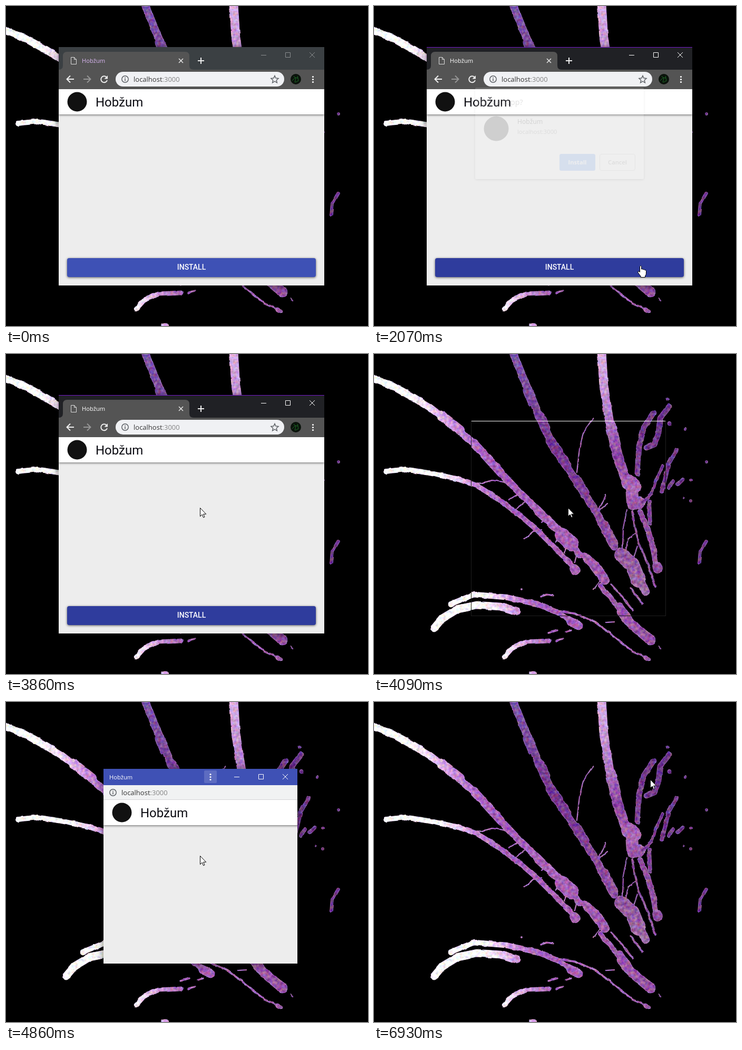
These frames come from a looping animation (687x608 px, 7.48 s). An HTML page:

```html
<!DOCTYPE html>
<html lang="en">
<head>
<meta charset="utf-8">
<title>App install</title>
<style>
  html, body { margin: 0; width: 100%; height: 100%; overflow: hidden; background: #000; }
  body > svg { position: absolute; left: 0; top: 0; will-change: transform; }
  text { font-family: "Open Sans", sans-serif; white-space: pre; }
  .roboto { font-family: Roboto, sans-serif; }
  .small { font-size: 11.2px; }
  .url { font-size: 13px; fill: #333; }
  .dim { fill: #858585; }
  .line { fill: none; stroke-width: 1; }
  .shadow { filter: drop-shadow(0 1px 2px #0009); }
  .window { filter: drop-shadow(0 2px 8px #0008); }
  #paint path { fill: none; stroke-linecap: round; stroke-linejoin: round; }
</style>
</head>
<body>

<!-- Paint splashes on the desktop -->
<svg width="687" height="608">
  <defs>
    <linearGradient id="across" gradientUnits="userSpaceOnUse" x1="0" y1="0" x2="445" y2="-156">
      <stop offset=".08" stop-color="#fff"/>
      <stop offset=".14" stop-color="#f0d4f4"/>
      <stop offset=".2" stop-color="#cb90d9"/>
      <stop offset=".3" stop-color="#a35cba"/>
      <stop offset=".48" stop-color="#a962b6"/>
      <stop offset=".75" stop-color="#8b4b9c"/>
      <stop offset="1" stop-color="#6a3488"/>
    </linearGradient>
    <linearGradient id="down" gradientUnits="userSpaceOnUse" x1="0" y1="0" x2="0" y2="300">
      <stop offset="0" stop-color="#dcb2e4"/>
      <stop offset=".4" stop-color="#b07ac4"/>
      <stop offset=".65" stop-color="#8a459f"/>
      <stop offset=".85" stop-color="#ad69b6"/>
      <stop offset="1" stop-color="#91509f"/>
    </linearGradient>
    <linearGradient id="middle" gradientUnits="userSpaceOnUse" x1="0" y1="0" x2="0" y2="450">
      <stop offset="0" stop-color="#8158a8"/>
      <stop offset=".4" stop-color="#74368e"/>
      <stop offset=".75" stop-color="#8f4f9e"/>
      <stop offset="1" stop-color="#9d6aa6"/>
    </linearGradient>
    <filter id="rough" filterUnits="userSpaceOnUse" x="0" y="0" width="687" height="608" color-interpolation-filters="sRGB">
      <feTurbulence type="fractalNoise" baseFrequency=".07" numOctaves="2" seed="4"/>
      <feDisplacementMap in="SourceGraphic" scale="4" xChannelSelector="R" yChannelSelector="G" result="shape"/>
      <feTurbulence type="fractalNoise" baseFrequency=".16" numOctaves="4" seed="9"/>
      <feColorMatrix values="1 .3 0 0 -.15  .3 1 0 0 -.15  0 .3 1 0 -.15  0 0 0 0 1" result="grain"/>
      <feComposite in="shape" in2="grain" operator="arithmetic" k2="1" k3=".44" k4="-.22"/>
      <feComposite in2="shape" operator="in" result="body"/>
      <feMorphology in="shape" operator="erode" radius="1" result="core"/>
      <feFlood flood-color="#d0a5e4" flood-opacity=".28"/>
      <feComposite in2="shape" operator="in"/>
      <feComposite in2="core" operator="out" result="rim"/>
      <feMerge><feMergeNode in="body"/><feMergeNode in="rim"/></feMerge>
    </filter>
  </defs>
  <g id="paint" filter="url(#rough)" stroke="url(#across)">
    <path stroke-width="14" d="M-8 44L35 61 75 83 105 101 130 120 165 148 200 180 240 225 275 262 310 295 340 325 372 352 388 380"/>
    <path stroke-width="19" d="M128 117L163 145M418 402L438 429M470 490L490 516M487 512L525 544"/>
    <path stroke-width="16" d="M190 170L240 225M310 298L345 330M404 388L420 404M466 480L480 500"/>
    <path stroke-width="28" d="M357 344L375 361"/>
    <path stroke-width="10" d="M23 223L60 219 110 227 160 238 195 250 235 275 275 305 310 335 345 370 378 404M388 381L402 384M430 440L462 480"/>
    <path stroke-width="18" d="M380 408L383 411"/>

    <g stroke="url(#middle)">
      <path stroke-width="15" d="M263 -5L283 45 300 85 317 125 340 175 370 220 395 258 420 298 440 335 456 366"/>
      <path stroke-width="19" d="M292 70L300 90M315 118L325 140M335 165L365 210M385 240L400 265M436 325L454 360"/>
      <path stroke-width="28" d="M470 382L490 400 502 430"/>
      <path stroke-width="17" d="M508 435L515 451"/>
    </g>
    <g stroke="url(#down)">
      <path stroke-width="17" d="M432 -5L436 60 447 130 460 190 475 235"/>
      <path stroke-width="20" d="M449 135L462 192 476 235"/>
      <path stroke-width="30" d="M484 244L492 251"/>
      <path stroke-width="24" d="M489 255L491 284 503 283"/>
      <path stroke-width="11" d="M505 300L520 335 530 370 536 404"/>
      <path stroke-width="18" d="M537 403L538 408"/>
    </g>

    <path stroke-width="11" d="M530 112L512 140 503 175 500 227M560 100L543 122 540 150 532 172 517 178"/>
    <path stroke-width="8" d="M575 182L560 205 553 235 546 262M522 280L524 322M567 242L560 254M585 239L576 248"/>
    <path stroke-width="6" d="M548 212L535 240 527 265 510 282M557 86v.1M591 143v.1M631 205v.1M601 279v.1M601 239v.1M630 356L619 375 617 397"/>
    <path stroke-width="9" d="M561 132v1M247 576L265 556 290 547 332 545"/>
    <path stroke-width="15" d="M114 521L130 502 160 484 195 477 240 480 270 489M301 610h2"/>
    <path stroke-width="11" d="M146 475L190 457 250 462 310 475 350 492 390 515"/>
    <path stroke-width="17" d="M374 509L389 516"/>
    <path stroke-width="4" d="M340 486L380 492 420 510 460 540 490 565 522 580M490 298L495 330 503 360 520 400 534 442M450 438L470 460 492 487M487 445L510 475M588 273v.1M280 447v.1"/>
    <path stroke-width="9" d="M515 577L521 580"/>
    <path stroke-width="3.5" d="M331 530L348 525M364 528L374 525M346 545L358 541M316 461L328 457 340 459"/>
    <path stroke-width="2.5" d="M416 123L397 150 390 180 385 225M480 295L473 330 472 370M495 340L482 352 478 372M197 247L225 240 252 244M256 278L272 268M268 295L285 282M285 352L303 337 318 334M440 268L425 300M443 284L428 297M416 447L428 432M318 320L325 312M345 358L350 352M362 378L366 366M381 396L384 384M440 510L456 509M540 555L544 560M500 365L493 385"/>
  </g>
</svg>

<!-- Windows -->
<svg width="687" height="608">
  <defs>
    <path id="controls" class="line" d="M0 5.5h10M46.5.5h9v9h-9zM92 0l10 10m0-10L92 10"/>
    <g id="info">
      <circle r="6.2" fill="none" stroke="#5f6368" stroke-width="1.5"/>
      <path d="M0-3.4v1.7M0-.8v4.2" stroke="#5f6368" stroke-width="1.6"/>
    </g>
    <g id="dots" fill="#fff"><circle cy="-5" r="1.6"/><circle r="1.6"/><circle cy="5" r="1.6"/></g>
    <g id="header">
      <rect width="504" height="48" fill="#fff" class="shadow"/>
      <circle cx="35" cy="24" r="18.5" fill="#111"/>
      <text class="roboto" x="70" y="33" font-size="24" fill="#0b0b12">Hobžum</text>
    </g>
    <clipPath id="buttonClip"><rect x="116" y="479" width="472" height="36" rx="4"/></clipPath>
  </defs>

  <g id="browser">
    <rect id="strip" class="window" x="100" y="78" width="504" height="453"/>
    <rect id="accent" x="100" y="78" width="504" height="1" fill="#7419c8"/>
    <path fill="#545454" d="M100 121q8 0 8-8V95q0-8 8-8H340q8 0 8 8V113q0 8 8 8H604V158H100Z"/>
    <path class="line" stroke="#ddd" d="M123.500 97.500h6l4 4v9h-10zM129.500 97.500v4h4"/>
    <text id="tabTitle" class="small" x="144" y="108">Hobžum</text>
    <path class="line" stroke="#e6e6e6" style="stroke-width:1.5" d="M328 100l8 8m0-8l-8 8"/>
    <path class="line" stroke="#eee" style="stroke-width:2" d="M364 104h12M370 98v12M129 139H116.500M122 132.500L115.500 139l6.500 6.500"/>
    <path class="line" stroke="#969696" style="stroke-width:2" d="M147 139h12.500M154 132.500l6.500 6.500-6.500 6.500"/>
    <path class="line" stroke="#eee" style="stroke-width:2" d="M190.500 135A6 6 0 1 0 192 141"/>
    <path fill="#eee" d="M193 132v6.500h-6.500z"/>
    <use id="browserControls" href="#controls" x="484" y="88"/>
    <rect x="208" y="125" width="320" height="28" rx="14" fill="#f0f1f4"/>
    <use href="#info" x="226" y="139"/>
    <text class="url" x="242" y="144">localhost<tspan class="dim">:3000</tspan></text>
    <path class="line" stroke="#5f6368" style="stroke-width:1.5" d="M510 132.500l2 4.600 5 .5-3.800 3.300 1.100 4.900-4.300-2.600-4.300 2.600 1.100-4.900-3.800-3.300 5-.5z"/>
    <circle cx="550" cy="139" r="10" fill="#0a120b"/>
    <path class="line" stroke="#1d6b26" d="M543 142l6-6 5 1M546 133l4 5-2 7M553 133l2 9-6 3"/>
    <use href="#dots" x="582.500" y="139.500"/>

    <svg x="100" y="158" width="504" height="373">
      <rect width="504" height="373" fill="#ededed"/>
      <use href="#header"/>
    </svg>
    <rect id="install" class="shadow" x="116" y="479" width="472" height="36" rx="4"/>
    <circle id="ripple" cx="506" cy="493" fill="#fff" clip-path="url(#buttonClip)"/>
    <text class="roboto" x="352" y="501" font-size="14" font-weight="500" fill="#fff" text-anchor="middle">INSTALL</text>

    <g id="dialog">
      <rect class="shadow" x="192" y="155" width="320" height="174" rx="2" fill="#fff"/>
      <text x="208" y="188" font-size="14.200" fill="#222">Install app?</text>
      <circle cx="232" cy="233" r="23.500" fill="#111"/>
      <text x="272" y="224" font-size="12.200" fill="#222">Hobžum</text>
      <text class="small" x="272" y="243" fill="#6b6b6b">localhost:3000</text>
      <rect id="confirm" x="352" y="281" width="68" height="32" rx="3.500"/>
      <text class="small" x="386" y="301" font-weight="700" fill="#fff" text-anchor="middle">Install</text>
      <rect x="428.500" y="281.500" width="67" height="31" rx="3.500" fill="#fff" stroke="#b8b8b8"/>
      <text class="small" x="462" y="301" font-weight="600" fill="#757575" text-anchor="middle">Cancel</text>
    </g>
  </g>

  <g id="outline">
    <rect class="line" x="184.500" y="127.500" width="369" height="370" stroke="#1f1f1f"/>
    <path class="line" stroke="#fff" d="M185 127.500H553"/>
  </g>

  <g id="app">
    <rect class="window" x="185" y="127" width="368" height="370" fill="#fff"/>
    <rect x="185" y="127" width="368" height="31" fill="#3f51b5"/>
    <text class="small" x="196" y="147" fill="#fff">Hobžum</text>
    <text id="origin" class="small" x="278" y="146" font-weight="700" fill="#fff">localhost:3000</text>
    <rect id="menu" x="376" y="130" width="24" height="24" rx="2" fill="#5d6cc1"/>
    <use href="#dots" x="388" y="142.500"/>
    <rect id="close" x="508" y="128" width="45" height="30"/>
    <use href="#controls" x="433" y="137" stroke="#fff"/>
    <g id="page">
      <rect x="185" y="158" width="368" height="28" fill="#f1f2f3"/>
      <use href="#info" x="203" y="172"/>
      <text class="url" x="219" y="177">localhost<tspan class="dim">:3000</tspan></text>
      <svg x="185" y="186" width="368" height="311">
        <rect width="368" height="311" fill="#ededed"/>
        <use href="#header"/>
      </svg>
      <path class="line" stroke="#d4d4d6" d="M185 185.500H553"/>
    </g>
  </g>

  <g id="cursor" fill="#fff" stroke="#000" stroke-linejoin="round">
    <path id="arrow" d="M.5 .5V16.500L4.200 13 6.600 18.700 9 17.700 6.600 12.200H11.700Z"/>
    <path id="hand" d="M-1.500 1.800Q0-.8 1.600 1.800V7Q3.600 6 4.600 7.800 6.600 7 7.600 8.600 10.300 8.200 10.500 10.500V15Q10.500 18 8.500 20V22.500H.2V20.500L-5 13.500Q-5.500 10.500-3 11L-1.500 12.800Z"/>
  </g>
</svg>

<script>
const LOOP = 7480;
const $ = id => document.getElementById(id);
const show = (id, on) => { $(id).style.opacity = on ? 1 : 0; };
const fade = (id, amount) => { $(id).style.opacity = amount; };
const fill = (id, color) => $(id).setAttribute("fill", color);
const ramp = (t, from, to) => Math.min(1, Math.max(0, (t - from) / (to - from)));
const smooth = p => p * p * (3 - 2 * p);
const mix = (a, b, p) => a + (b - a) * p;
const blend = (a, b, p) => `rgb(${a.map((v, i) => Math.round(mix(v, b[i], p)))})`;

// Pointer moves: start, end, x and y from, x and y to
const moves = [
  [590, 1290, 668, 285, 511, 477],
  [1290, 1510, 511, 477, 506, 493],
  [2560, 3150, 506, 493, 368, 292],
  [6030, 6720, 373, 287, 524, 147],
];

function pointer(t) {
  const move = moves.findLast(m => t >= m[0]);
  if (!move) return null;
  const [start, end, x0, y0, x1, y1] = move;
  const p = smooth(ramp(t, start, end));
  return { x: mix(x0, x1, p), y: mix(y0, y1, p) };
}

function draw(t) {
  const at = pointer(t);
  const focused = t >= 1690;

  show("browser", t < 4090);
  show("accent", focused);
  fill("strip", focused ? "#202125" : "#3b4043");
  fill("tabTitle", focused ? "#fff" : "#d9b6f2");
  $("browserControls").setAttribute("stroke", focused ? "#fff" : "#8b8e90");

  const hover = ramp(t, 1340, 1500), pressed = ramp(t, 1690, 2000);
  fill("install", pressed ? blend([51, 68, 166], [47, 60, 157], pressed)
                          : blend([62, 81, 181], [51, 68, 166], hover));
  $("ripple").setAttribute("r", mix(40, 400, smooth(ramp(t, 1690, 1915))));
  fade("ripple", focused ? .14 * (1 - ramp(t, 1850, 2070)) : 0);

  fade("dialog", ramp(t, 2050, 2210) * (1 - ramp(t, 3780, 3860)));
  const onConfirm = t > 2560 && at.x < 420 && at.y < 313;
  fill("confirm", onConfirm ? "#4a87ee" : "#4285f4");
  $("confirm").setAttribute("stroke", onConfirm ? "#a9c8f8" : "none");

  show("outline", t >= 4090 && t < 4170);
  show("app", t >= 4170 && t < 6930);
  show("page", t >= 4240);
  show("menu", t >= 4860);
  fade("origin", .93 * ramp(t, 5010, 5400) + .07 * ramp(t, 5400, 5640));
  const onClose = t > 6030 && at.x >= 508 && at.y < 158;
  fill("close", t >= 6780 ? "#f1707a" : onClose ? "#e81123" : "none");

  show("cursor", at);
  if (!at) return;
  const onInstall = t < 3150 && at.y >= 479;
  $("cursor").setAttribute("transform", `translate(${Math.round(at.x)} ${Math.round(at.y)})`);
  show("hand", onInstall);
  show("arrow", !onInstall);
}

function tick() {
  draw(performance.now() % LOOP);
  requestAnimationFrame(tick);
}
tick();
</script>
</body>
</html>
```
